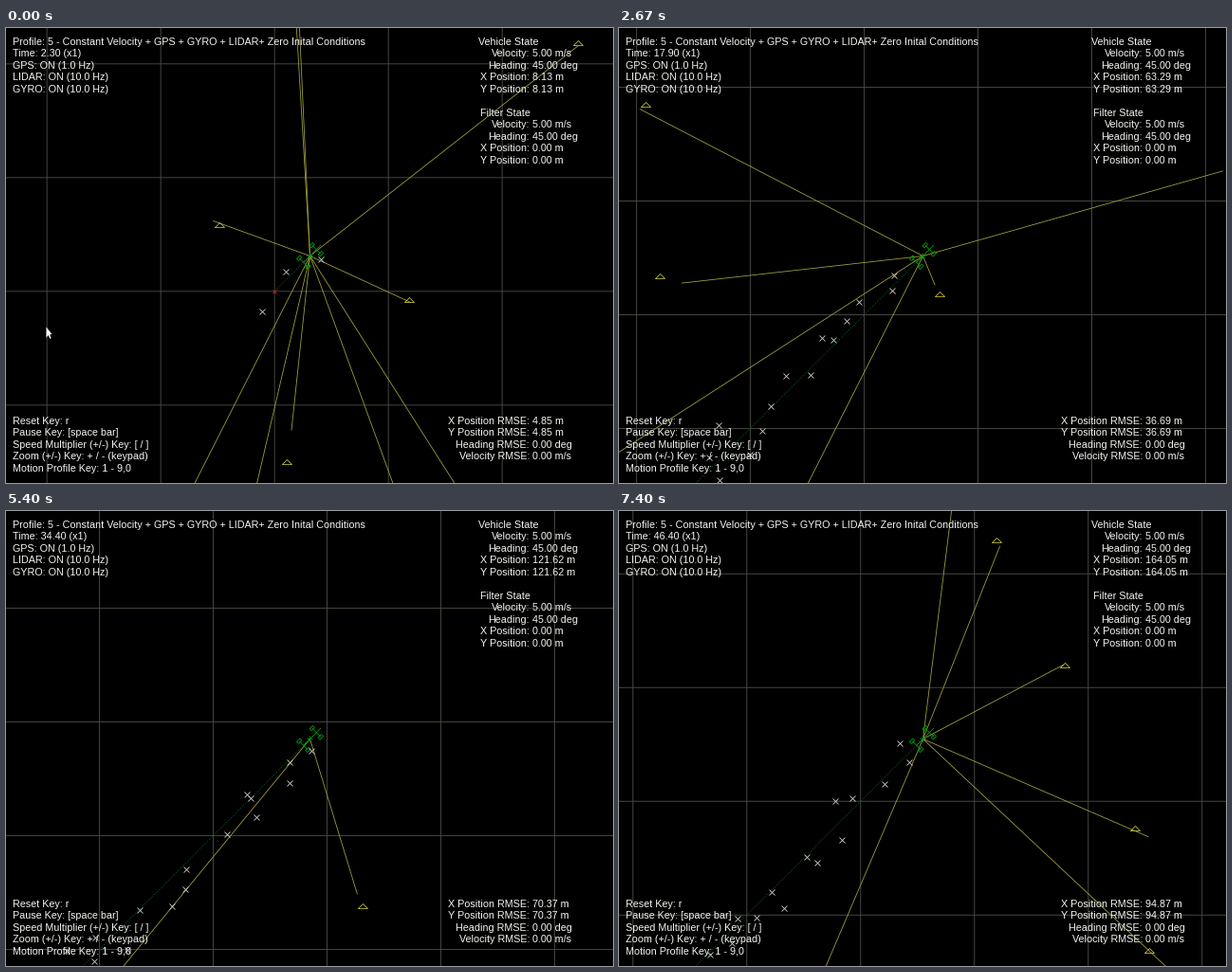
A matplotlib script that plays this animation: 640x480 px, repeating every 7470 ms.

```python
import math

import numpy as np
import matplotlib.pyplot as plt
from matplotlib.animation import FuncAnimation
from matplotlib.collections import LineCollection

W, H, DPI = 640, 480, 100
LOOP, TICK, PICTURES = 7470, 30, 112   # ms, ms, distinct pictures per loop
SCALE = 4.8                            # pixels per metre
STEP = 0.5 * math.cos(math.pi / 4)     # metres per axis in 0.1 s
CX, CY = W / 2, H / 2
REACH = 90                             # lidar range in metres
GRID = 25
SIGMA = 3
CURSOR_PICTURES = 10

INK, GRAY, YELLOW, GREEN = "#f4f4f0", "#4c4c46", "#a4a440", "#00a010"

# simulated seconds at a few pictures
CLOCK = [0, 24, 40, 111], [2.3, 11.4, 17.9, 46.4]

# landmark positions in metres
MAP = np.array([
    (-11.7, 15), (29.8, -1.6), (66.9, 54.8), (3.1, -37.1),
    (5.5, 58.8), (2.3, 96.5), (133.1, 84.9), (-29, -64.8),
    (-8.5, -73), (36.9, -71), (50.6, -62.7), (195.2, 180.2),
    (180.2, 207.7), (210.6, 144.4), (213.8, 117.5), (173.3, 247.3)])

# one noisy fix per second along the diagonal
track = np.arange(48)[:, None] * 10 * STEP
GPS = track + np.random.default_rng(5).normal(0, SIGMA, (48, 2))


def px(size):
    return size * 72 / DPI


fig = plt.figure(figsize=(W / DPI, H / DPI), dpi=DPI, facecolor="black")
ax = fig.add_axes([0, 0, 1, 1])
ax.set_xlim(-0.5, W - 0.5)
ax.set_ylim(H - 0.5, -0.5)
ax.axis("off")


def lines(color, width, z):
    lc = LineCollection([], colors=color, linewidths=px(width), zorder=z)
    lc.set_snap(False)
    return ax.add_collection(lc, autolim=False)


def marks(shape, size, color, z):
    return ax.plot([], [], ls="", marker=shape, ms=px(size), mec=color,
                   mfc="none", mew=px(0.8), zorder=z)[0]


def block(x, y, rows, ha="left"):
    return [ax.text(x, y + 12.5 * k + 4.2, row, ha=ha, va="baseline", color=INK,
                    family="Liberation Sans", fontsize=px(10.75), zorder=10)
            for k, row in enumerate(rows)]


def table(y, names):
    block(551.5, y, [name + ":" for name in names], "right")
    return block(554.5, y, [""] * len(names))


def fill(cells, values):
    for cell, value in zip(cells, values):
        cell.set_text(value)


def metres(v):
    return f"{v:.2f} m"


def draw_vehicle():
    def place(fwd, side):
        k = math.sqrt(0.5) * SCALE
        return CX + (fwd + side) * k, CY + (side - fwd) * k

    def wheel(f, s):
        corners = [(-.5, -.3), (.5, -.3), (.5, .3), (-.5, .3), (-.5, -.3)]
        return [place(f + a, s + b) for a, b in corners]

    parts = [wheel(f, s) for f in (-2, 2) for s in (-1.35, 1.35)]
    parts += [[place(f, -1.35), place(f, 1.35)] for f in (-2, 2)]
    parts += [[place(-2, 0), place(3.4, 0)]]
    parts += [[(CX - 3, CY), (CX + 3, CY)], [(CX, CY - 3), (CX, CY + 3)]]
    lines(GREEN, 0.8, 5).set_segments(parts)


grid = lines(GRAY, 0.9, 1)
trail = ax.plot([], [], color="#10602a", lw=px(0.9), ls=(0, (1, 1.6)), zorder=2)[0]
start = marks("x", 4.5, "#d02020", 3)
rays = lines(YELLOW, 0.8, 4)
beacons = marks([(-5, -2), (5, -2), (0, 3), (-5, -2)], 10, "#c4c43c", 5)
fixes = marks("x", 6, "#d8d8d0", 6)
draw_vehicle()
cursor = ax.fill([42, 42, 44.2, 46, 47.2, 45.6, 48],
                 [315, 326, 323.6, 327.4, 326.8, 323, 322.6],
                 color="white", lw=0, zorder=11)[0]

head = block(6.5, 13, [
    "Profile: 5 - Constant Velocity + GPS + GYRO + LIDAR+ Zero Inital Conditions",
    "", "GPS: ON (1.0 Hz)", "LIDAR: ON (10.0 Hz)", "GYRO: ON (10.0 Hz)"])
block(6.5, 413, ["Reset Key: r", "Pause Key: [space bar]",
                 "Speed Multiplier (+/-) Key: [ / ]",
                 "Zoom (+/-) Key: + / - (keypad)",
                 "Motion Profile Key: 1 - 9,0"])
block(497, 13, ["Vehicle State"])
block(500, 88, ["Filter State"])
STATE = ["Velocity", "Heading", "X Position", "Y Position"]
truth = table(25.5, STATE)
guess = table(100.5, STATE)
errors = table(413, [name + " RMSE" for name in STATE[2:] + STATE[1::-1]])
fill(guess, ["5.00 m/s", "45.00 deg", metres(0), metres(0)])


def screen(points, pos):
    x, y = np.atleast_2d(points).T
    return CX + (x - pos) * SCALE, CY - (y - pos) * SCALE


def scan(n, pos):
    """Lidar hits with range and bearing noise."""
    rng = np.random.default_rng(n)
    dx, dy = (MAP - pos).T
    dist = np.hypot(dx, dy)
    reach = dist + rng.normal(0, SIGMA, len(MAP))
    angle = np.arctan2(dy, dx) + rng.normal(0, 0.02, len(MAP))
    hits = pos + np.column_stack([reach * np.cos(angle), reach * np.sin(angle)])
    return zip(*screen(hits[dist < REACH], pos))


def update(tick):
    # look ahead so that a change never falls after its due time
    picture = int((tick * TICK + 24) * PICTURES / LOOP)
    n = round(10 * float(np.interp(picture, *CLOCK)))
    pos = n * STEP

    # the camera trails the vehicle by one step
    x0, y0 = (v[0] for v in screen((STEP, STEP), pos))
    gap = GRID * SCALE
    grid.set_segments(
        [[(x, -1), (x, H)] for x in np.arange(x0 % gap, W, gap)]
        + [[(-1, y), (W, y)] for y in np.arange(y0 % gap, H, gap)])

    trail.set_data(*screen([(0, 0), (pos, pos)], pos))
    start.set_data([x0], [y0])
    fixes.set_data(*screen(GPS[:n // 10 + 1], pos))
    beacons.set_data(*screen(MAP, pos))
    rays.set_segments([[(CX, CY), hit] for hit in scan(n, pos)])
    cursor.set_visible(picture < CURSOR_PICTURES)

    head[1].set_text(f"Time: {n / 10:.2f} (x1)")
    fill(truth, ["5.00 m/s", "45.00 deg", metres(pos), metres(pos)])
    rmse = metres(STEP * math.sqrt((n + 1) * (2 * n + 1) / 6))
    fill(errors, [rmse, rmse, "0.00 deg", "0.00 m/s"])
    return []


anim = FuncAnimation(fig, update, frames=LOOP // TICK, interval=TICK,
                     repeat=True, repeat_delay=0, blit=False)
plt.show()
```
